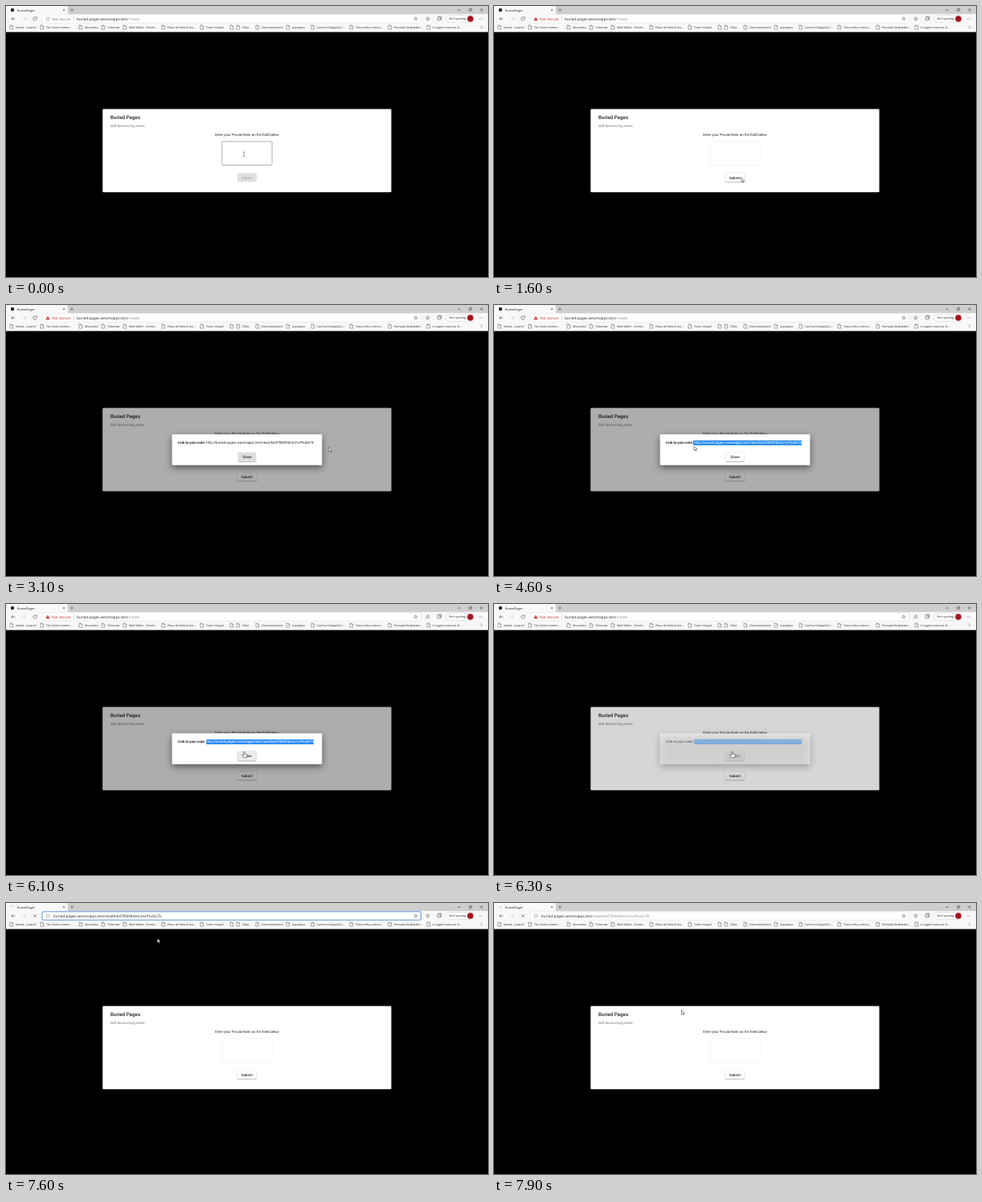
Write an HTML page with a canvas that moves like this. It is 600x338 px and loops after 8 s.

```html
<!DOCTYPE html>
<html lang="en">
<head>
<meta charset="utf-8">
<title>Buried Pages</title>
<style>
html, body { margin: 0; width: 100%; height: 100%; overflow: hidden; background: #000; }
canvas { display: block; width: 600px; height: 338px; }
</style>
</head>
<body>
<canvas id="stage"></canvas>
<script>
const W = 600, H = 338, LOOP = 8000, STEP = 100;
const canvas = document.getElementById('stage');
const scale = window.devicePixelRatio || 1;
canvas.width = W * scale;
canvas.height = H * scale;
const c = canvas.getContext('2d');

const UI = '"Open Sans", "Noto Sans", sans-serif';
const PAGE = 'Roboto, sans-serif';
const HOST = 'buried-pages.woomapps.test';
const NOTE = '/read/kb4TRNXRdmLVvvPtuGG7k';
const MESSAGE = 'Hello world';

const bookmarks = [
  [5, 'Venda : LuzaroY'], [43, 'The Quiet Lantern...'], [91, 'Murvadoo'],
  [119, 'Tolvamex'], [146, 'Web Wallet - Orvelo...'], [194, 'Placa de Rede Zuno...'],
  [242, 'Toren Vasquil'], [279, ''], [287, 'Oltav'], [311, 'Oversized photo'],
  [349, 'tupoplays'], [380, 'Camisa Colegial (LU...'], [428, 'Tesourinha Lumcor...'],
  [476, 'Pomada Modelador...'], [524, 'A viagem noturna: O...']
];

// Pointer stops: time, x, y, shape on arrival
const stops = [
  [0, 296, 185, 'beam'], [600, 296, 185, 'beam'], [900, 308, 214, 'hand'],
  [1600, 308, 214, 'arrow'], [2400, 308, 214, 'arrow'], [3000, 402, 177.5, 'arrow'],
  [3100, 402, 177.5, 'arrow'], [3300, 384, 171.5, 'beam'], [3500, 384, 171.5, 'beam'],
  [3700, 388, 172.5, 'beam'], [3800, 388, 172.5, 'beam'], [4600, 249, 176, 'arrow'],
  [4700, 249, 176, 'arrow'], [5000, 251, 175.5, 'arrow'], [5200, 251, 175.5, 'arrow'],
  [5900, 296.5, 184.5, 'hand'], [6300, 296.5, 184.5, 'hand'], [6900, 173.5, 14.5, 'beam'],
  [7500, 173.5, 14.5, 'beam'], [7900, 233.5, 133.5, 'arrow'], [8000, 233.5, 133.5, 'arrow']
];

const clamp = v => Math.max(0, Math.min(1, v));
const ramp = (t, a, b) => clamp((t - a) / (b - a));

function text(s, x, y, size, color, family = UI, weight = 400, align = 'left') {
  c.font = `${weight} ${size}px ${family}`;
  c.textAlign = align;
  c.fillStyle = color;
  c.fillText(s, x, y);
  return c.measureText(s).width;
}

function rect(x, y, w, h, color) {
  c.fillStyle = color;
  c.fillRect(x, y, w, h);
}

function box(x, y, w, h, r, fill, stroke, line = 0.4) {
  c.beginPath();
  c.roundRect(x, y, w, h, r);
  if (fill) { c.fillStyle = fill; c.fill(); }
  if (stroke) { c.strokeStyle = stroke; c.lineWidth = line; c.stroke(); }
}

function disc(x, y, r, color) {
  c.beginPath();
  c.arc(x, y, r, 0, Math.PI * 2);
  c.fillStyle = color;
  c.fill();
}

function ring(x, y, r, color, from = 0, to = Math.PI * 2, line = 0.5) {
  c.beginPath();
  c.arc(x, y, r, from, to);
  c.strokeStyle = color;
  c.lineWidth = line;
  c.stroke();
}

// Open polyline from a flat list of coordinates
function path(points, color, line = 0.5) {
  c.beginPath();
  for (let i = 0; i < points.length; i += 2) c.lineTo(points[i], points[i + 1]);
  if (color) {
    c.strokeStyle = color;
    c.lineWidth = line;
    c.stroke();
  }
}

function cross(x, y, r, color, line) {
  path([x - r, y - r, x + r, y + r], color, line);
  path([x - r, y + r, x + r, y - r], color, line);
}

function star(x, y, r) {
  c.beginPath();
  for (let i = 0; i < 10; i++) {
    const a = i * Math.PI / 5 - Math.PI / 2, d = i % 2 ? r * 0.45 : r;
    c.lineTo(x + d * Math.cos(a), y + d * Math.sin(a));
  }
  c.closePath();
  c.strokeStyle = '#444';
  c.lineWidth = 0.45;
  c.stroke();
}

function shadow(color, blur, dy) {
  c.shadowColor = color;
  c.shadowBlur = blur * scale;
  c.shadowOffsetY = dy * scale;
}

function raised(x, y, w, h, r, fill, color, blur, dy) {
  c.save();
  shadow(color, blur, dy);
  box(x, y, w, h, r, fill);
  c.restore();
}

function button(label, x, y, w, h, fill, color, lift) {
  if (lift) raised(x, y, w, h, 1.2, fill, 'rgba(0,0,0,.45)', lift, 0.6);
  else box(x, y, w, h, 1.2, fill);
  text(label, x + w / 2, y + h / 2 + 1.6, 4.375, color, PAGE, 500, 'center');
}

function tabStrip(t, loading) {
  rect(0, 0, W, 10, '#cecece');
  box(0, 0, 77, 11, [0, 2, 0, 0], '#f8f8f8');
  if (loading) ring(7, 5, 1.5, '#888', t / 160, t / 160 + 1.8, 0.6);
  else disc(8, 5, 2.2, '#222');
  text('BuriedPages', 14, 6.6, 3.75, '#222');
  cross(72, 5, 1.2, '#333');
  path([80, 5, 84, 5], '#444');
  path([82, 3, 82, 7], '#444');
  path([562, 5, 566, 5], '#222');
  box(576.5, 4.2, 2.4, 2.4, 0, null, '#222');
  path([577.5, 4.2, 577.5, 3.3, 579.9, 3.3, 579.9, 5.7, 578.9, 5.7], '#222', 0.4);
  cross(592, 5, 1.6, '#222');
}

function address(t, focused, loading) {
  box(45, 10.8, 471.5, 10.4, 1.3, '#fff', focused ? '#3a7bd0' : '#d2d2d2', focused ? 0.8 : 0.4);
  const base = 17.5, size = 4.65, pasted = t >= 7300;
  let x = 88;
  if (pasted) {
    x = 59;
    if (loading) infoIcon();
    else box(50.5, 13.6, 3, 4.4, 0.3, null, '#555');
  } else {
    if (t < 100) {
      infoIcon();
      text('Not secure', 57, base, size, '#777');
    } else {
      path([52, 13.5, 54.6, 18.2, 49.4, 18.2]);
      c.fillStyle = '#c8232c';
      c.fill();
      rect(51.75, 15, 0.5, 1.6, '#fff');
      rect(51.75, 17, 0.5, 0.5, '#fff');
      text('Not secure', 57, base, size, '#c8232c');
    }
    rect(84, 12.8, 0.4, 6.4, '#aaa');
  }
  const tail = pasted ? NOTE : '/create';
  const selected = t >= 6900 && !pasted;
  if (selected) {
    c.font = `400 ${size}px ${UI}`;
    rect(x, 12.6, c.measureText(HOST + tail).width, 6.6, '#0078d7');
  }
  const w = text(HOST, x, base, size, selected ? '#fff' : '#222');
  text(tail, x + w, base, size, selected ? '#fff' : focused ? '#222' : '#888');
  star(510, 16, 2.3);
}

function infoIcon() {
  ring(52, 16, 2.2, '#666', 0, 7, 0.4);
  rect(51.8, 15.6, 0.4, 1.6, '#666');
  rect(51.8, 14.7, 0.4, 0.5, '#666');
}

function toolbar(t, loading) {
  rect(0, 10, W, 22.5, '#f8f8f8');
  path([11.5, 16, 6.8, 16], '#222');
  path([8.8, 14, 6.8, 16, 8.8, 18], '#222');
  path([20, 16, 24.5, 16], '#bbb');
  path([22.6, 14, 24.6, 16, 22.6, 18], '#bbb');
  if (loading) cross(36, 16, 1.9, '#333');
  else {
    ring(36, 16, 2.2, '#333', -0.3, 5.2);
    path([38.3, 13.2, 38.3, 15, 36.5, 15], '#333');
  }
  address(t, t >= 6900 && t < 7900, loading);
  star(525, 16, 2.4);
  box(537, 14, 3.6, 4, 0.5, null, '#333');
  path([538.2, 14, 538.2, 13, 541.8, 13, 541.8, 17, 540.6, 17], '#333');
  path([537.8, 16, 539.8, 16], '#333', 0.4);
  box(548, 11.6, 35, 8.8, 4.4, '#fff', '#bbb');
  text('Not syncing', 551.5, 17.3, 3.8, '#222');
  disc(578, 16, 3.8, '#a5141c');
  for (let i = -1; i < 2; i++) disc(591 + i * 1.8, 16, 0.4, '#333');

  for (const [x, label] of bookmarks) {
    path([x, 24, x + 2.3, 24, x + 3.8, 25.5, x + 3.8, 29, x, 29, x, 23.8], '#444', 0.45);
    path([x + 2.3, 24, x + 2.3, 25.5, x + 3.8, 25.5], '#444', 0.4);
    text(label, x + 7, 27.8, 3.5, '#222');
  }
  path([591, 24.5, 592.8, 26.3, 591, 28.1], '#333');
}

function card(t, dim) {
  box(120.3, 128.5, 359.3, 103.8, 1.2, '#fff');
  text('Buried Pages', 130, 140.9, 6.25, 'rgba(0,0,0,.87)', PAGE, 500);
  text('Self-destructing notes.', 130, 150.9, 4.375, 'rgba(0,0,0,.54)', PAGE);
  text('Enter your Private Note on the field below', 300, 162, 4.375, 'rgba(0,0,0,.87)', PAGE, 400, 'center');

  const sent = t >= 1000;
  const focus = t >= 100 && t < 900;
  box(268.9, 169, 62.3, 29.4, 1.5, null,
    sent ? 'rgba(0,0,0,.12)' : 'rgba(0,0,0,.8)', focus ? 0.6 : 0.4);
  if (!sent && t >= 100) {
    const shown = MESSAGE.slice(0, Math.ceil(MESSAGE.length * ramp(t, 0, 600)));
    const w = text(shown, 272.5, 180.4, 4.375, 'rgba(0,0,0,.87)', PAGE);
    if (focus) rect(272.8 + w, 176.4, 0.35, 5, '#222');
  }

  if (t < 100) button('Submit', 288, 208.5, 24, 11, '#dfdfdf', '#a8a8a8', 0);
  else button('Submit', 288, 208.5, 24, 11, t >= 1000 && t < 1300 ? '#e6e6e6' : '#fff', 'rgba(0,0,0,.87)', 1.4);

  if (dim) box(120.3, 128.5, 359.3, 103.8, 1.2, `rgba(0,0,0,${0.32 * dim})`);
}

function dialog(t, dim, p) {
  c.save();
  c.globalAlpha = dim;
  c.beginPath();
  c.rect(120.3, 128.5, 359.3, 103.8);
  c.clip();
  raised(206.6, 161.2, 186.8, 38.6, 1.2, '#fff', 'rgba(0,0,0,.5)', 9, 3.2);
  text('Link to your note:', 214, 173.4, 4.375, 'rgba(0,0,0,.87)', PAGE, 700);

  const link = 'http://' + HOST + NOTE, x = 249.2, y = 173.4;
  text(link, x, y, 4.375, 'rgba(0,0,0,.87)', PAGE);
  if (t >= 3900) {
    const end = x + c.measureText(link).width;
    const start = t < 4600 ? Math.min(end, p.x) : t < 4800 ? 247.8 : x;
    c.save();
    c.beginPath();
    c.rect(start, 168.6, end - start, 6.5);
    c.clip();
    rect(start, 168.6, end - start, 6.5, '#2b8ef5');
    text(link, x, y, 4.375, '#fff', PAGE);
    c.restore();
  }

  const over = p.shape === 'hand';
  button('Close', 289, 184, 22, 11, t < 3900 ? '#dedede' : over ? '#ebebeb' : '#fff',
    'rgba(0,0,0,.87)', over ? 2.2 : 1.4);
  c.restore();
}

function pointerAt(t) {
  let i = 0;
  while (i < stops.length - 2 && t >= stops[i + 1][0]) i++;
  const a = stops[i], b = stops[i + 1];
  const k = ramp(t, a[0], b[0]);
  return { x: a[1] + (b[1] - a[1]) * k, y: a[2] + (b[2] - a[2]) * k, shape: pickShape(t, a[3]) };
}

function pickShape(t, shape) {
  if (t > 600 && t < 900 || t > 5200 && t < 5900 || t > 6300 && t < 6900 || t > 7500) return 'arrow';
  return shape;
}

function pointer({ x, y, shape }) {
  c.save();
  c.translate(x, y);
  c.lineJoin = 'round';
  if (shape === 'beam') {
    path([-1.2, -2.9, -0.3, -2.9, 0, -2.5, 0.3, -2.9, 1.2, -2.9], '#222', 0.4);
    path([0, -2.6, 0, 2.6], '#222', 0.5);
    path([-1.2, 2.9, -0.3, 2.9, 0, 2.5, 0.3, 2.9, 1.2, 2.9], '#222', 0.4);
  } else {
    if (shape === 'hand') {
      path([-0.6, 0, 0.6, 0, 0.6, 2.4, 3.4, 3, 3.6, 5, 2.8, 7, -0.8, 7, -2.8, 4.2, -2.2, 3.4, -0.6, 4.5]);
    } else {
      path([0, 0, 0, 5.4, 1.2, 4.3, 2, 6.1, 2.9, 5.7, 2.1, 4, 3.8, 3.9]);
    }
    c.closePath();
    c.fillStyle = '#fff';
    c.fill();
    c.strokeStyle = '#222';
    c.lineWidth = 0.5;
    c.stroke();
  }
  c.restore();
}

function draw(now) {
  const t = Math.floor((now % LOOP) / STEP) * STEP;
  const loading = t >= 7600;
  const dim = ramp(t, 1700, 1900) * (1 - ramp(t, 6200, 6400));
  const p = pointerAt(t);
  c.setTransform(scale, 0, 0, scale, 0, 0);
  c.textRendering = 'geometricPrecision';
  rect(0, 0, W, H, '#000');
  tabStrip(t, loading);
  toolbar(t, loading);
  card(t, dim);
  if (dim) dialog(t, dim, p);
  pointer(p);
}

function tick() {
  draw(performance.now());
  requestAnimationFrame(tick);
}
tick();
</script>
</body>
</html>
```
